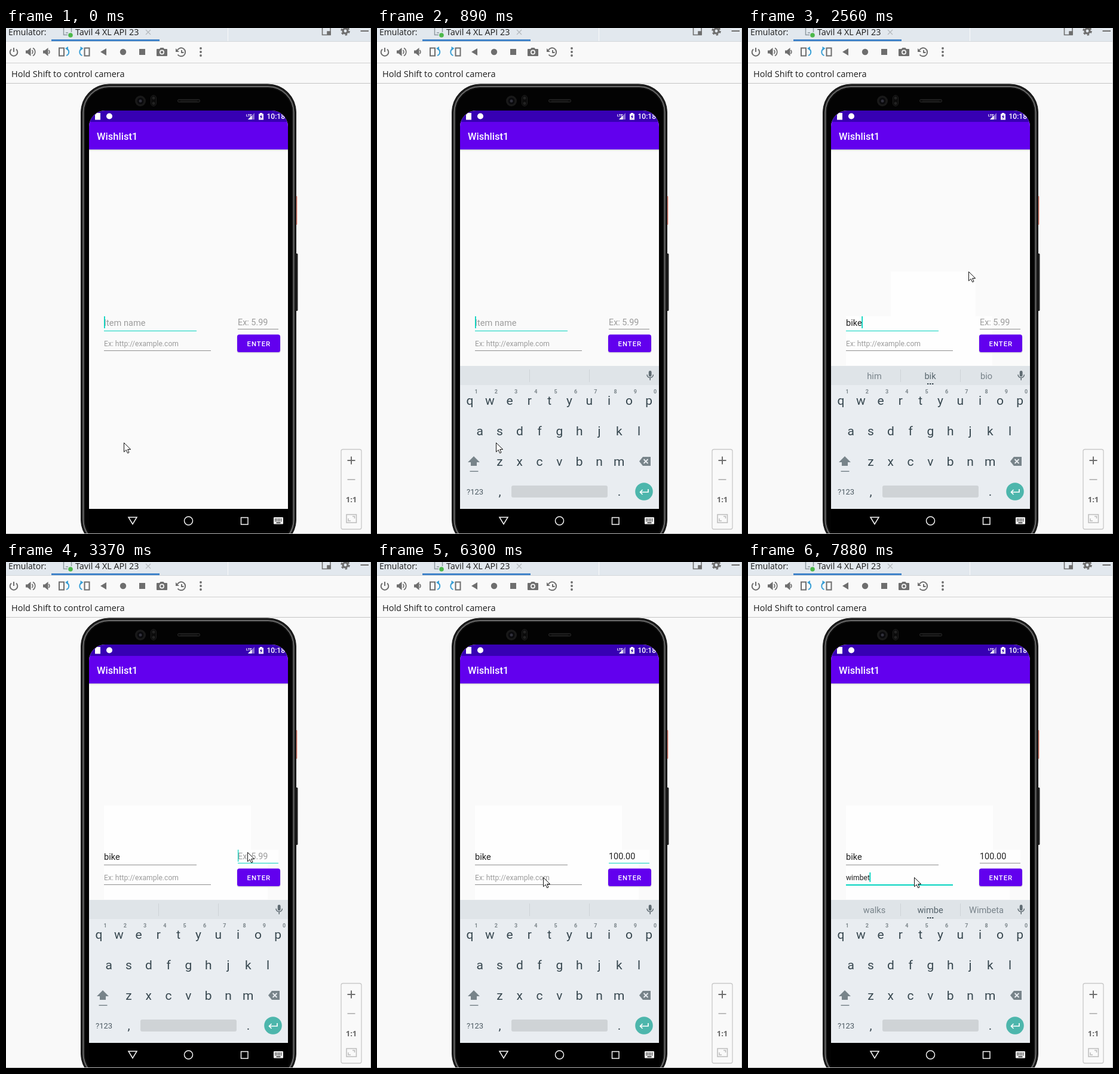
An HTML page for the animation above (8 s loop, 611x846 px).

```html
<!DOCTYPE html>
<html lang="en">
<head>
<meta charset="utf-8">
<title>Wishlist</title>
<style>
html, body { margin: 0; width: 100%; height: 100%; overflow: hidden; background: #f9f9f9; }
svg { display: block; width: 611px; height: 846px; }
text { font-family: Roboto, sans-serif; white-space: pre; }
.ui { font-family: "Open Sans", "Noto Sans", sans-serif; fill: #1c1c1c; }
.mid { text-anchor: middle; }
.key { font-size: 21px; fill: #37474f; text-anchor: middle; }
.num { font-size: 9px; font-weight: 700; fill: #7d878c; text-anchor: middle; }
.sug { font-size: 14.6px; fill: #78838a; text-anchor: middle; }
</style>
</head>
<body>
<svg viewBox="0 0 611 846" xmlns="http://www.w3.org/2000/svg">
<defs>
  <clipPath id="screen"><path d="M139 808V165A27 27 0 0 1 166 138H445A27 27 0 0 1 472 165V808Z"/></clipPath>
</defs>

<!-- tool window header -->
<rect width="611" height="846" fill="#f9f9f9"/>
<rect width="611" height="22" fill="#e2e8ee"/>
<rect y="22" width="611" height="1" fill="#d3d7db"/>
<rect x="371" width="1" height="22" fill="#fafafa"/>
<rect x="76" y="19" width="181" height="3" fill="#4083c9"/>
<text class="ui" x="4" y="12" font-size="14">Emulator:</text>
<text class="ui" x="116" y="12" font-size="14.4">Tavil 4 XL API 23</text>
<g fill="none" stroke="#8d989f" stroke-width="1.5">
  <path d="M96.5 0V11.5H103M100 8H104M109.5 0V7"/>
  <path d="M234 3l8 8m0-8l-8 8" stroke="#b3b8bc" stroke-width="1.2"/>
</g>
<circle cx="108" cy="12" r="3.8" fill="#4cb84a"/>
<g fill="none" stroke="#6e6e6e" stroke-width="1.6">
  <path d="M529.5 0V11.5H543V0"/><path d="M538 6H543V11H538Z" fill="#6e6e6e"/>
  <circle cx="568" cy="5" r="4" stroke-width="3.2"/>
  <circle cx="568" cy="5" r="6.5" stroke-width="2.5" stroke-dasharray="3.4 3.4"/>
  <path d="M593.5 5H607" stroke-width="2"/>
</g>

<!-- toolbar -->
<g fill="none" stroke="#6e6e6e" stroke-width="2">
  <path d="M9 35.5A6.3 6.3 0 1 0 17 35.5M13 33V40"/>
  <path d="M43.5 37A4 4 0 0 1 43.5 43M45 33.5A7.5 7.5 0 0 1 45 46.5" stroke-width="1.7"/>
  <path d="M71.5 37A4 4 0 0 1 71.5 43" stroke-width="1.7"/>
  <path d="M89 33.5H97V46.5H89Z"/>
  <path d="M131.5 33.5H139.5V46.5H131.5Z"/>
  <path d="M101 46C107 44 106 36 101.5 35" stroke="#389fd6"/>
  <path d="M127.5 46C121.5 44 122.5 36 127 35" stroke="#389fd6"/>
  <path d="M287 37A7 7 0 1 1 287.5 44.5M294 37V41H297.5"/>
</g>
<path d="M104 31V38L99 34ZM124.5 31V38L129.5 34Z" fill="#389fd6"/>
<g fill="#6e6e6e">
  <path d="M33 37.5H36L41.5 33V47L36 42.5H33Z"/><path d="M62 37.5H65L70.5 33V47L65 42.5H62Z"/>
  <path d="M168 34V46L158 40Z"/><circle cx="196" cy="40" r="5.2"/><rect x="223" y="35" width="10" height="10"/>
  <path d="M284 34V40H290Z"/>
  <path fill-rule="evenodd" d="M253 35H257L258.5 33H263.5L265 35H269Q270 35 270 36V46Q270 47 269 47H253Q252 47 252 46V36Q252 35 253 35ZM261 36.5A4 4 0 1 0 261 44.5A4 4 0 1 0 261 36.5Z"/>
  <circle cx="261" cy="40.5" r="2.3"/>
  <circle cx="326" cy="34" r="1.9"/><circle cx="326" cy="40" r="1.9"/><circle cx="326" cy="46" r="1.9"/>
</g>
<rect y="58" width="611" height="1" fill="#d0d0d0"/>
<text class="ui" x="9" y="82" font-size="14.5">Hold Shift to control camera</text>
<rect y="92" width="611" height="1" fill="#c4c4c4"/>
<rect x="610" width="1" height="846" fill="#c4c4c4"/>

<!-- phone -->
<rect x="484" y="281" width="3.5" height="48" rx="1" fill="#e98473"/>
<rect x="484" y="377" width="4.5" height="96" rx="1.5" fill="#222"/>
<rect x="125.5" y="94" width="360" height="775" rx="47" fill="#1d1d1d" stroke="#0c0c0c"/>
<rect x="129.5" y="98" width="352" height="767" rx="43" fill="#000" stroke="#6c6c6c" stroke-width="2"/>
<rect x="131.5" y="100" width="348" height="763" rx="41" fill="#030303" stroke="#1c1c1c"/>
<circle cx="225" cy="122" r="9" fill="#191919"/><circle cx="225" cy="122" r="5.5" fill="#0a0a0d"/>
<circle cx="225" cy="122" r="2.5" fill="#30303a"/>
<rect x="242.5" y="112.5" width="9" height="18" rx="4.5" fill="#0b0b0b" stroke="#1e1e1e"/>
<circle cx="247" cy="117" r="2.5" fill="#222"/><circle cx="247" cy="126" r="2.5" fill="#222"/>
<rect x="287.5" y="119.5" width="37" height="4.5" rx="2" fill="#0d0d0d" stroke="#2a2a2a"/>
<path d="M292 122H320" stroke="#222"/>

<g clip-path="url(#screen)">
  <rect x="139" y="138" width="333" height="666" fill="#fafafa"/>
  <rect x="139" y="203" width="333" height="1" fill="#c9c5cf"/>
  <rect x="139" y="204" width="333" height="1.5" fill="#ececee"/>
  <rect x="139" y="138" width="333" height="19" fill="#3700b3"/>
  <rect x="139" y="157" width="333" height="46" fill="#6200ee"/>
  <path d="M152 142H158V153.500H149V145Z" fill="#fff"/>
  <circle cx="173" cy="147.5" r="5" fill="#fff"/>
  <text x="402" y="148" font-size="6" font-weight="700" fill="#fff">LTE</text>
  <path d="M416 142V153H405Z" fill="#8b6fd2"/><path d="M411.500 146.500V153H405Z" fill="#fff"/>
  <path d="M425 142H429V143.500H431V153.500H423V143.500H425Z" fill="#fff"/>
  <path d="M427.800 144.500L424.800 149H426.800L426.200 152.500L429.400 147.800H427.400Z" fill="#3700b3"/>
  <text x="436.5" y="152" font-size="12" font-weight="500" fill="#fff">10:18</text>
  <text x="152" y="186.5" font-size="16.5" font-weight="500" fill="#fff">Wishlist1</text>
</g>

<path id="lit" fill="#fefefe"/>
<g id="form"></g>
<rect x="386.5" y="513.5" width="73" height="30" rx="4" fill="#d6d3dc"/>
<rect x="387" y="512.500" width="72" height="29.500" rx="3.5" fill="#6200ee"/>
<text x="403.5" y="531.5" font-size="11.34" font-weight="500" letter-spacing="1.01" fill="#fff">ENTER</text>

<g clip-path="url(#screen)"><g id="board"></g></g>

<!-- navigation bar -->
<rect x="139" y="804" width="333" height="42" fill="#000"/>
<g fill="none" stroke="#f4f4f4" stroke-width="1.5">
  <path d="M205 818H219L212 829.5Z"/><circle cx="305.5" cy="824" r="7"/><rect x="393.5" y="818.5" width="11.5" height="11.5"/>
</g>
<rect x="448" y="818" width="16" height="11.5" rx="1" fill="#f4f4f4"/>
<path d="M450 821.2H462M450 824H462" stroke="#000" stroke-width="1.4" stroke-dasharray="1.5 1"/>
<path d="M452.5 827.2H459.5" stroke="#000" stroke-width="1.3"/>

<!-- zoom panel -->
<rect x="561" y="704.5" width="34" height="133.5" rx="3" fill="#f9f9f9" stroke="#c8c8c8" stroke-width="1.3"/>
<g fill="none" stroke="#6e6e6e" stroke-width="2">
  <path d="M571.5 723H584.5M578 716.5V729.5"/>
  <path d="M571.5 755H584.5" stroke="#bcbcbc"/>
  <path d="M570 813.5H586.5V827H570ZM573 820V824H577M580 816.5H583.5V820" stroke="#bcbcbc" stroke-width="1.5"/>
</g>
<text class="ui mid" x="578" y="793" font-size="13" font-weight="700" style="fill:#6a6a6a">1:1</text>
<rect y="845" width="611" height="1" fill="#b9b9b9"/>

<path id="mouse" d="M.5 .5V15.8L4.2 12.4L6.6 17.8L9 16.8L6.7 11.5H11.7Z" fill="#fff" stroke="#111"/>
</svg>

<script>
const NS = "http://www.w3.org/2000/svg";
const byId = id => document.getElementById(id);
const form = byId("form"), board = byId("board"), mouse = byId("mouse"), lit = byId("lit");
const LOOP = 8000, TEAL = "#03d3bf";

function set(el, attrs) {
  for (const k in attrs) el.setAttribute(k, attrs[k]);
}
function add(parent, tag, attrs, text) {
  const el = document.createElementNS(NS, tag);
  set(el, attrs);
  if (text) el.textContent = text;
  return parent.appendChild(el);
}

// Keyboard
add(board, "rect", { x: 139, y: 565, width: 333, height: 33, fill: "#dfe4e8" });
add(board, "rect", { x: 139, y: 597, width: 333, height: 211, fill: "#e9edf1" });
add(board, "path", { d: "M255.5 571V592M355.5 571V592", stroke: "#cdd3d7" });
const rows = [["qwertyuiop", 155.5, 630], ["asdfghjkl", 172.2, 681], ["zxcvbnm", 205.5, 732]];
rows.forEach(([keys, x0, y], row) => [...keys].forEach((c, i) => {
  const x = x0 + i * 33.3;
  add(board, "text", { class: "key", x, y }, c);
  if (!row) add(board, "text", { class: "num", x: x + 10.5, y: 611 }, String((i + 1) % 10));
}));
add(board, "text", { class: "key", x: 205.5, y: 782 }, ",");
add(board, "text", { class: "key", x: 405.5, y: 782 }, ".");
add(board, "text", { x: 150, y: 779.5, "font-size": 13, fill: "#4c5a62" }, "?123");
add(board, "rect", { x: 225, y: 765, width: 161, height: 20, rx: 3, fill: "#cfd3d6" });
add(board, "path", { d: "M162 716L172 726H167V732H157V726H152ZM155.5 740.5H169.5V742H155.5Z", fill: "#78848a" });
add(board, "path", { d: "M445 717H458V732H445L439 724.5Z", fill: "#78848a" });
add(board, "path", { d: "M446.5 721L453.5 728M453.5 721L446.5 728", stroke: "#e9edf1", "stroke-width": 1.8 });
add(board, "circle", { cx: 447, cy: 775, r: 14.8, fill: "#4db6ac" });
add(board, "path", { d: "M454 771V776H440.5M444.5 772L440.5 776L444.5 780", fill: "none", stroke: "#fff", "stroke-width": 1.7 });
add(board, "rect", { x: 454.8, y: 573, width: 4.8, height: 10, rx: 2.4, fill: "#5f6b72" });
add(board, "path", { d: "M452 579.5A5.2 5.2 0 0 0 462.4 579.5M457.2 585V589", fill: "none", stroke: "#5f6b72", "stroke-width": 1.5 });
const words = [211.5, 305, 399].map(x => add(board, "text", { class: "sug", x, y: 587 }));
words[1].style.fill = "#56646c";
const dots = add(board, "path", { d: "M300 594h2.4v2h-2.4zM304 594h2.4v2h-2.4zM308 594h2.4v2h-2.4z", fill: "#37474f" });

// Input field; returns its update function
function field(o) {
  const line = add(form, "rect", { x: o.x, y: o.lineY, width: o.width });
  const label = add(form, "text", { x: o.x, y: o.base, "font-size": o.size });
  const caret = add(form, "rect", { y: o.caretY, width: o.caretW, height: o.caretH, fill: TEAL });
  return (text, active, blink) => {
    label.textContent = text || o.hint;
    set(label, { fill: text ? "#212121" : "#9c9c9c" });
    set(line, { height: active ? o.thick : 1, fill: active ? TEAL : "#8f8f8f" });
    const end = text ? label.getComputedTextLength() - .5 : 0;
    set(caret, { x: o.x + end, opacity: blink ? 1 : 0 });
  };
}
const fields = {
  name: field({ x: 164, width: 155, base: 497.5, size: 14.6, lineY: 506, thick: 1, caretY: 482, caretW: 1.8, caretH: 20, hint: "Item name" }),
  price: field({ x: 388, width: 68, base: 497, size: 14.4, lineY: 503, thick: 1, caretY: 481, caretW: 1.2, caretH: 20, hint: "Ex: 5.99" }),
  link: field({ x: 164, width: 179, base: 532, size: 12.15, lineY: 539, thick: 2, caretY: 519, caretW: 1.8, caretH: 16, hint: "Ex: http://example.com" })
};

// Each step changes only the listed values
const start = { x: 197, y: 693, drop: 250, focus: "name", line: "name", caret: 1, name: "", price: "", link: "", sug: "", lit: "" };
const steps = [
  [120, { drop: 150, x: 199 }],
  [240, { drop: 40 }],
  [360, { drop: 0, caret: 0 }],
  [890, { caret: 1 }],
  [1170, { name: "b" }],
  [1290, { sug: "but b by", lit: "M164 482H409V564H164Z" }],
  [1410, { name: "bi", sug: "big bi bit" }],
  [1670, { name: "bik" }],
  [1820, { name: "bike", sug: "him bik bio" }],
  [2320, { x: 208, y: 672 }],
  [2440, { x: 239, y: 590 }],
  [2560, { x: 369, y: 407, lit: "M239 407H381V482H409V564H164V482H239Z" }],
  [2840, { x: 392, y: 455, lit: "M164 407H410V564H164Z" }],
  [2960, { x: 398, y: 479, sug: "bikes bike biker" }],
  [3110, { x: 402, y: 483 }],
  [3230, { x: 404, y: 485 }],
  [3370, { focus: "price", line: "price", sug: "", lit: "M164 407H410V481H456V504H438V564H164Z" }],
  [3930, { price: "1" }],
  [4240, { price: "10" }],
  [4390, { price: "100" }],
  [4890, { caret: 0 }],
  [5040, { price: "100.", caret: 1 }],
  [5330, { price: "100.0" }],
  [5480, { price: "100.00" }],
  [5880, { caret: 0 }],
  [6030, { x: 331, y: 507 }],
  [6180, { x: 290, y: 522 }],
  [6300, { x: 278, y: 527 }],
  [6420, { line: "link" }],
  [6540, { focus: "link", caret: 1 }],
  [6950, { link: "w" }],
  [7070, { sug: "was w we" }],
  [7340, { link: "wi", sug: "with wi will" }],
  [7490, { link: "wim", sug: "win wi wish" }],
  [7640, { link: "wimb", sug: "win wim wide" }],
  [7760, { link: "wimbe", sug: "walk wimb wine" }],
  [7880, { link: "wimbet", sug: "walks wimbe Wimbeta" }]
];

let shown = -1;
function draw(t) {
  const n = steps.filter(s => s[0] <= t).length;
  if (n === shown) return;
  shown = n;
  const s = Object.assign({}, start, ...steps.slice(0, n).map(p => p[1]));
  for (const id in fields) fields[id](s[id], s.line === id, s.focus === id && s.caret);
  const list = s.sug.split(" ");
  words.forEach((w, i) => { w.textContent = list[i] || ""; });
  set(dots, { opacity: s.sug ? 1 : 0 });
  set(lit, { d: s.lit });
  set(board, { transform: `translate(0 ${s.drop})` });
  set(mouse, { transform: `translate(${s.x} ${s.y})` });
}

const t0 = performance.now();
function tick() {
  draw((performance.now() - t0) % LOOP);
  requestAnimationFrame(tick);
}
tick();
</script>
</body>
</html>
```
